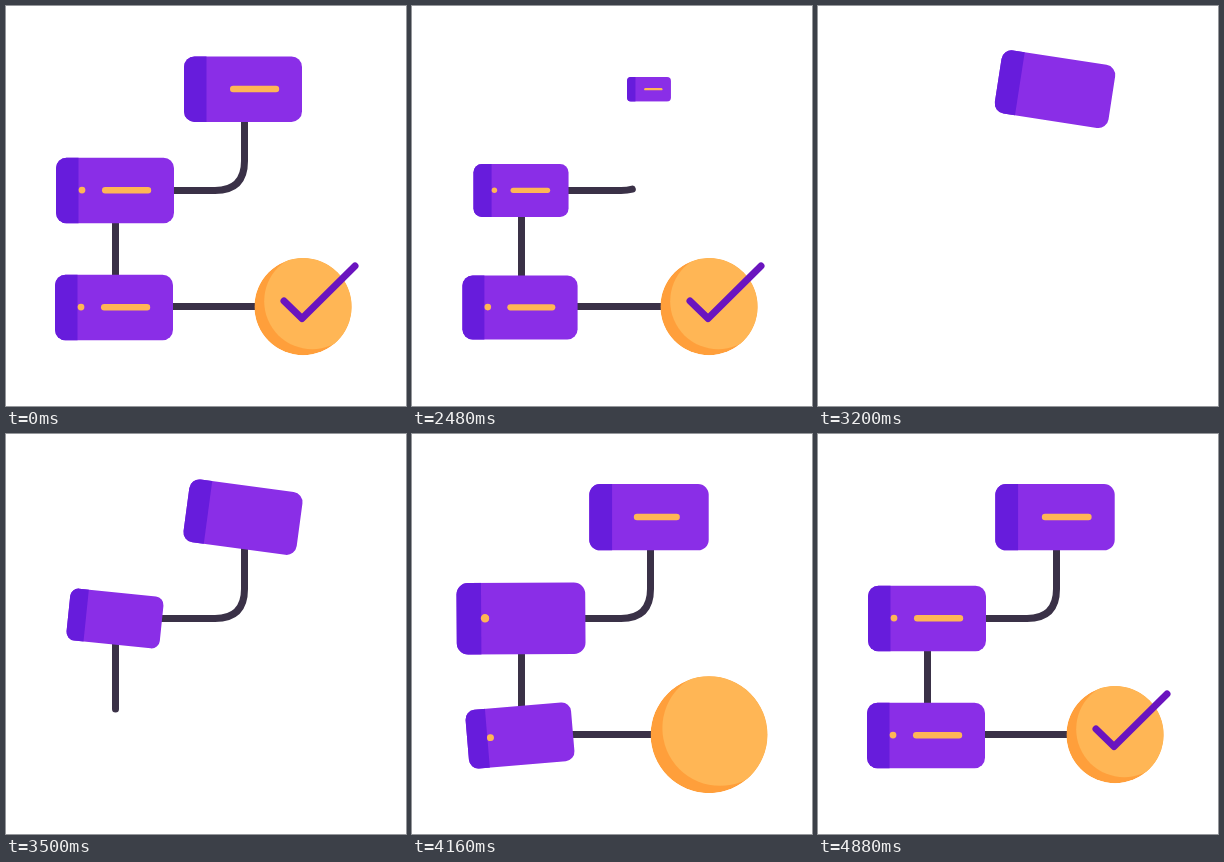
Animation, 400 px wide and 400 px high, one loop 4.91 s. Source, as an HTML page:

```html
<!DOCTYPE html>
<html lang="en">
<head>
<meta charset="utf-8">
<title>Flow chart</title>
<style>
  html, body { margin: 0; width: 100%; height: 100%; overflow: hidden; background: #fff; }
  svg { display: block; width: 100vw; height: 100vh; }
  .line { fill: none; stroke: #3a3147; stroke-width: 7; stroke-linecap: round; stroke-linejoin: round; }
  .check { stroke: #6a14bf; }
  .dash { stroke: #ffb655; stroke-width: 6.4; stroke-linecap: round; }
  .dot { fill: #ffb655; }
</style>
</head>
<body>
<svg viewBox="0 0 400 400">
  <defs>
    <clipPath id="card"><rect x="-59" y="-32.75" width="118" height="65.5" rx="10.5"/></clipPath>
    <clipPath id="disc"><circle r="48.6"/></clipPath>
  </defs>
  <path id="line1" class="line" pathLength="1" d="M238.5 83V155Q238.5 184.5 209 184.5H109"/>
  <path id="line2" class="line" pathLength="1" d="M109.5 184.5V275"/>
  <path id="line3" class="line" pathLength="1" d="M109 300.5H278.5"/>
  <g id="boxes"></g>
  <g id="coin">
    <g clip-path="url(#disc)">
      <circle r="48.6" fill="#ff9f3b"/>
      <circle cx="9.2" cy="-5.5" r="48" fill="#ffb655"/>
    </g>
  </g>
  <path id="check" class="line check" pathLength="1" d="M278 295L296 312.5L349 260"/>
</svg>
<script>
const LOOP = 4910;
const $ = id => document.getElementById(id);
const clamp = x => Math.min(1, Math.max(0, x));
const span = (t, from, to) => clamp((t - from) / (to - from));
const lerp = (a, b, p) => a + (b - a) * p;
const easeIn = (u, n) => u ** n;
const easeOut = u => 1 - (1 - u) ** 3;
const easeInOut = u => (1 - Math.cos(Math.PI * u)) / 2;

// Swings between extremes; `launch` makes the first stretch start at full speed.
function swing(keys, t, launch) {
  if (t <= 0) return keys[0][1];
  for (let i = 1; i < keys.length; i++) {
    const [t0, a] = keys[i - 1], [t1, b] = keys[i];
    if (t < t1) {
      const u = (t - t0) / (t1 - t0);
      return lerp(a, b, launch && i === 1 ? Math.sin(u * Math.PI / 2) : easeInOut(u));
    }
  }
  return keys[keys.length - 1][1];
}

const POP = [[0, 0], [260, 1.19], [560, 0.87], [830, 1.11], [980, 0.985], [1110, 1]];
const TILT = [[0, 0], [275, 14.5], [365, 14.5], [590, -5], [820, 0]];
const COIN_POP = [[0, 0], [240, 1.34], [520, 0.9], [780, 1.03], [1040, 1]];
const DOT_POP = [[0, 0], [130, 1.15], [300, 0.95], [480, 1]];

// out: exit span, back: entry start, dash: span in which the dash slides out
const boxes = [
  { x: 237, y: 83.2, out: [2010, 2560], back: 3045, dash: [3860, 4400], rest: 1.012 },
  { x: 109, y: 184.5, out: [2180, 2700], back: 3380, dash: [4160, 4660], dot: 4010 },
  { x: 108, y: 301.5, out: [2340, 2830], back: 3542, dash: [4200, 4740], dot: 4040 }
];

for (const box of boxes) {
  const g = document.createElementNS("http://www.w3.org/2000/svg", "g");
  g.innerHTML = `
    <g clip-path="url(#card)">
      <rect x="-60" y="-34" width="120" height="68" fill="#8a2ee7"/>
      <rect x="-60" y="-34" width="23.5" height="68" fill="#671cdc"/>
    </g>
    ${box.dot ? '<circle class="dot" cx="-33" cy="-.4"/>' : ""}
    <line class="dash" y1="-.2" y2="-.2"/>`;
  $("boxes").append(g);
  box.g = g;
  box.dashEl = g.querySelector(".dash");
  box.dotEl = g.querySelector(".dot");
}

function show(el, on) {
  el.style.display = on ? "" : "none";
}

function place(el, x, y, scale, turn = 0) {
  show(el, scale > 0.003);
  el.setAttribute("transform", `translate(${x} ${y}) rotate(${turn}) scale(${scale})`);
}

function trim(el, a, b) {
  show(el, b - a > 0.002);
  el.setAttribute("stroke-dasharray", `${b - a} 2`);
  el.setAttribute("stroke-dashoffset", -a);
}

function drawBox(box, t) {
  const entering = t >= box.back;
  const age = t - box.back;
  const scale = entering
    ? swing(POP, age, true) * (box.rest || 1)
    : 1 - easeIn(span(t, ...box.out), 3);
  place(box.g, box.x, box.y, scale, entering ? swing(TILT, age) : 0);

  const p = entering ? easeOut(span(t, ...box.dash)) : 1;
  show(box.dashEl, p > 0);
  box.dashEl.setAttribute("x1", lerp(-33, -9.8, p));
  box.dashEl.setAttribute("x2", lerp(-33, 33, p));
  if (box.dotEl) {
    box.dotEl.setAttribute("r", 3.4 * (entering ? swing(DOT_POP, t - box.dot, true) : 1));
  }
}

function drawLine(id, out, back, t) {
  if (t < back[0]) trim($(id), easeIn(span(t, ...out), 2), 1);
  else trim($(id), 0, easeInOut(span(t, ...back)));
}

function draw(t) {
  boxes.forEach(box => drawBox(box, t));
  drawLine("line1", [2200, 2600], [3180, 3430], t);
  drawLine("line2", [2480, 2760], [3370, 3495], t);
  drawLine("line3", [2700, 3000], [3580, 3765], t);

  const coinBack = 3815;
  place($("coin"), 297, 300.7, t < coinBack
    ? 1 - easeIn(span(t, 2510, 3000), 3)
    : swing(COIN_POP, t - coinBack, true));
  trim($("check"), 0, t < coinBack
    ? 1 - easeIn(span(t, 2490, 3040), 2)
    : easeInOut(span(t, 4200, 4680)));
}

const start = performance.now();
function tick() {
  draw((performance.now() - start) % LOOP);
  requestAnimationFrame(tick);
}
tick();
</script>
</body>
</html>
```
